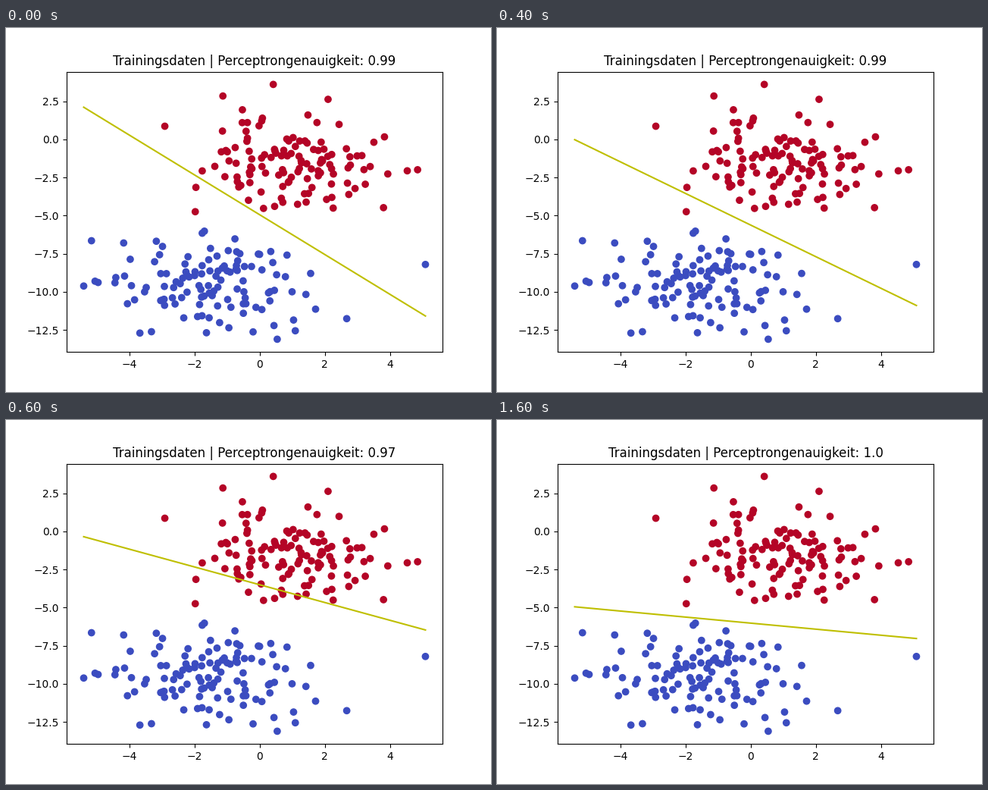
Write a matplotlib script that moves like this. It is 640 px wide and 480 px high and loops after 2 s.

```python
import matplotlib.pyplot as plt
import numpy as np
from matplotlib.animation import FuncAnimation

SAMPLES, STD, TEST_SHARE = 300, 1.55, 0.2
STEP_MS, FRAMES = 200, 10

# Height of the decision line at the left and right end, per epoch.
LEFT = [2.11, 0.07, -0.02, -0.35, -2.35, -4.95]
RIGHT = [-11.59, -9.85, -10.90, -6.47, -5.50, -7.03]


def make_blobs(n, std, seed):
    """Two shuffled Gaussian clusters with labels 0 and 1."""
    rng = np.random.RandomState(seed)
    centers = rng.uniform(-10, 10, (2, 2))
    points = np.vstack([rng.normal(c, std, (n // 2, 2)) for c in centers])
    labels = np.repeat([0, 1], n // 2)
    order = np.arange(n)
    rng.shuffle(order)
    return points[order], labels[order]


def training_part(points, labels, share, seed):
    order = np.random.RandomState(seed).permutation(len(points))
    keep = order[int(np.ceil(share * len(points))):]
    return points[keep], labels[keep]


X, y = training_part(*make_blobs(SAMPLES, STD, seed=2), TEST_SHARE, seed=123)
ends = [X[:, 0].min(), X[:, 0].max()]


def accuracy(heights):
    """Share of points on the correct side of the line."""
    predicted = X[:, 1] > np.interp(X[:, 0], ends, heights)
    return round(float(np.mean(predicted == y)), 2)


fig, ax = plt.subplots(figsize=(6.4, 4.8), dpi=100)
ax.scatter(X[:, 0], X[:, 1], marker="o", c=y, cmap="coolwarm")
boundary, = ax.plot(ends, [LEFT[0], RIGHT[0]], "y")
title = ax.set_title("")


def update(frame):
    epoch = min(frame, len(LEFT) - 1)
    heights = [LEFT[epoch], RIGHT[epoch]]
    boundary.set_ydata(heights)
    title.set_text("Trainingsdaten | Perceptrongenauigkeit: "
                   f"{accuracy(heights)}")
    return boundary, title


anim = FuncAnimation(fig, update, frames=FRAMES, interval=STEP_MS,
                     repeat=True, repeat_delay=0)
plt.show()
```
